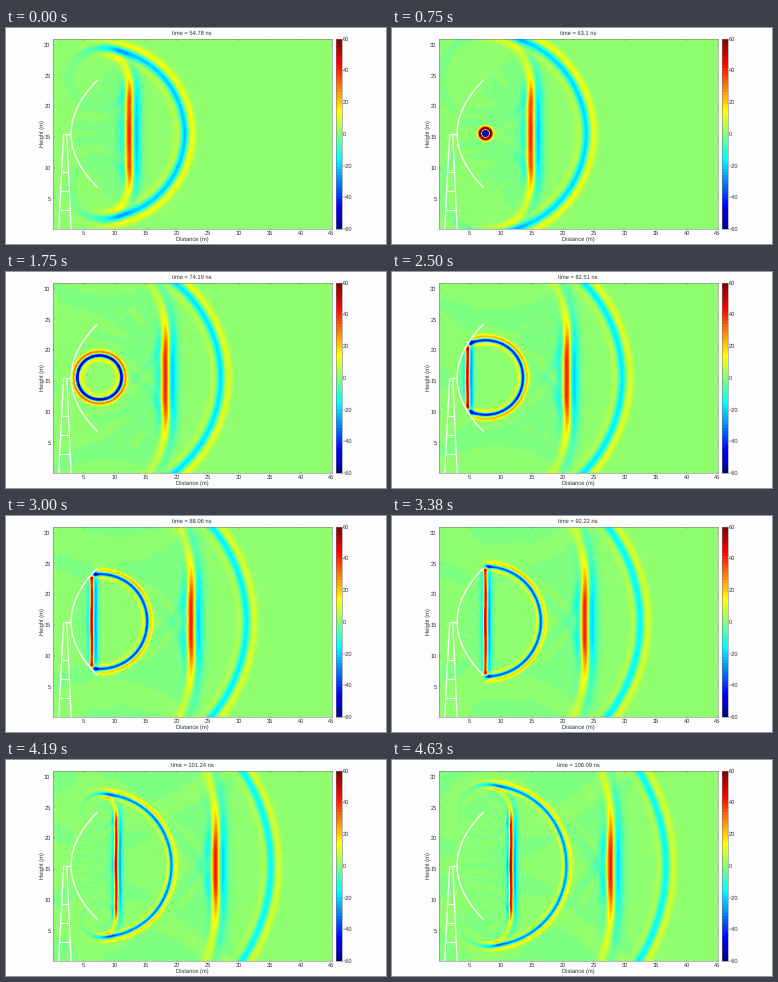
Write a matplotlib script that moves like this. It is 380 by 216 pixels and loops after 4.7 s.

```python
import numpy as np
import matplotlib.pyplot as plt
from matplotlib.animation import FuncAnimation
from matplotlib.colors import ListedColormap

W, H, DPI = 380, 216, 100
LOOP_MS, TICK_MS, POSE_MS, POSES = 4700, 25, 62.5, 75

# Field grid in metres and nanoseconds
C, DX, DT = 0.299792, 0.1, 0.231134
XMAX, YMAX, PAD = 45, 31, 40
FIRST_STEP, STEPS_PER_POSE = 237, 3

# Parabolic dish with the feed in its focus
VERTEX, FOCAL, MID, HALF = 3.0, 4.5, 15.5, 8.75

# Pulses: centre time, width, strength
PULSES = [(8.6, 2.25, 71), (62.05, 1.125, 94)]
SKEW = 0.4

INK, FRAME_INK = "0.2", "0.45"
plt.rcParams.update({"font.family": "Liberation Sans", "text.color": INK,
                     "text.hinting": "none"})


def px(size):
    return size * 72 / DPI


def dish_x(y):
    return VERTEX + (y - MID) ** 2 / (4 * FOCAL)


def source(t):
    """Second plus some third derivative of a Gaussian for each pulse."""
    total = 0.0
    for centre, width, strength in PULSES:
        z = (t - centre) / width
        shape = z * z - 1 + SKEW * (3 * z - z ** 3)
        total += strength / np.sqrt(width) * shape * np.exp(-z * z / 2)
    return total


def edge_taper(n):
    i = np.arange(n)
    depth = np.maximum(0, PAD - np.minimum(i, n - 1 - i))
    return np.exp(-(0.011 * depth) ** 2)


def simulate():
    """Scalar wave equation with a conducting dish and absorbing borders."""
    nx = round(XMAX / DX) + 1 + 2 * PAD
    ny = round(YMAX / DX) + 1 + 2 * PAD
    keep = np.outer(edge_taper(ny), edge_taper(nx)).astype(np.float32)
    diag = np.full((ny, nx), 4, np.float32)

    # The zero of the field lies between grid points, so the first free
    # cell in front of the metal gets a softened diagonal.
    y = (np.arange(ny) - PAD) * DX
    rows = np.flatnonzero(np.abs(y - MID) <= HALF)
    pos = dish_x(y[rows]) / DX + PAD
    cols = np.floor(pos).astype(int)
    frac = pos - cols
    keep[rows, cols] = keep[rows, cols + 1] = 0
    diag[rows, cols + 2] -= (1 - frac) / (2 - frac)
    diag = diag[1:-1, 1:-1]

    feed = PAD + round(MID / DX), PAD + round((VERTEX + FOCAL) / DX)
    courant2 = np.float32((C * DT / DX) ** 2)
    old = np.zeros((ny, nx), np.float32)
    now = np.zeros_like(old)
    poses = []
    last = FIRST_STEP + STEPS_PER_POSE * (POSES - 1)
    for step in range(1, last + 1):
        new = 2 * now - old
        new[1:-1, 1:-1] += courant2 * (
            now[2:, 1:-1] + now[:-2, 1:-1] + now[1:-1, 2:] + now[1:-1, :-2]
            - diag * now[1:-1, 1:-1])
        new[feed] += (DT / DX) ** 2 * source((step - 1) * DT)
        new *= keep
        now *= keep
        old, now = now, new
        since = step - FIRST_STEP
        if since >= 0 and since % STEPS_PER_POSE == 0:
            poses.append(now[PAD:-PAD, PAD:-PAD].copy())
    return poses


def jet64():
    x = 4 * np.arange(1, 65) / 64
    bands = [np.minimum(x - 1.5 + s, 4.5 - s - x) for s in (0, 1, 2)]
    return ListedColormap(np.clip(np.stack(bands, axis=1), 0, 1))


def add_axes(left, top, right, bottom):
    ax = fig.add_axes([left / W, 1 - bottom / H,
                       (right - left) / W, (bottom - top) / H])
    for spine in ax.spines.values():
        spine.set(linewidth=px(0.5), color=FRAME_INK)
    ax.tick_params(direction="in", color=FRAME_INK, labelcolor=INK,
                   width=px(0.4), labelsize=px(5.7))
    return ax


def label(x, y, text, **kw):
    return fig.text(x / W, 1 - y / H, text, fontsize=px(5.8),
                    ha="center", va="center", **kw)


def white_line(x, y, width=1.0):
    ax.plot(x, y, color="white", lw=px(width), solid_capstyle="butt")


fields = simulate()
fig = plt.figure(figsize=(W / DPI, H / DPI), dpi=DPI, facecolor="#fdfcfe")

ax = add_axes(46.5, 10.5, 325.5, 201)
cmap = jet64()
half = DX / 2
# The lower limit is a touch below -60 so that zero falls in the upper band.
image = ax.imshow(fields[0], cmap=cmap, vmin=-60.05, vmax=60, origin="lower",
                  aspect="auto",
                  extent=(-half, XMAX + half, -half, YMAX + half))

# Dish and its tower
ys = np.linspace(MID - HALF, MID + HALF, 80)
white_line(dish_x(ys), ys, 1.3)
left_leg, right_leg = (1.0, 1.8), (3.0, 2.3)
for leg in (left_leg, right_leg):
    white_line(leg, (0, MID), 1.2)
for height in (3.1, 6.2, 9.3):
    white_line([np.interp(height, (0, MID), leg)
                for leg in (left_leg, right_leg)], (height, height))
white_line((left_leg[1], VERTEX), (MID, MID), 1.2)

ax.set_xlim(0, XMAX)
ax.set_ylim(0, YMAX)
ax.set_xticks(range(5, 46, 5))
ax.set_yticks(range(5, 31, 5))
ax.tick_params(top=True, right=True, length=px(1.5), pad=px(2))

bar = add_axes(329.5, 10.5, 335.5, 201)
bar.imshow(np.linspace(-60, 60, 64)[:, None], cmap=cmap, origin="lower",
           aspect="auto", interpolation="nearest", extent=(0, 1, -60, 60))
bar.set_xticks([])
bar.set_yticks(range(-60, 61, 20))
bar.yaxis.tick_right()
bar.tick_params(length=px(1), pad=px(1.5))

label(186, 211, "Distance (m)")
label(36.5, 106, "Height (m)", rotation=90)
title = label(186, 5, "")


def update(tick):
    pose = min(int((tick + 0.5) * TICK_MS / POSE_MS), POSES - 1)
    time = (FIRST_STEP + STEPS_PER_POSE * pose) * DT
    image.set_data(fields[pose])
    title.set_text(f"time = {round(time, 2):g} ns")
    return image, title


anim = FuncAnimation(fig, update, frames=LOOP_MS // TICK_MS, interval=TICK_MS,
                     repeat=True, repeat_delay=0)
plt.show()
```
